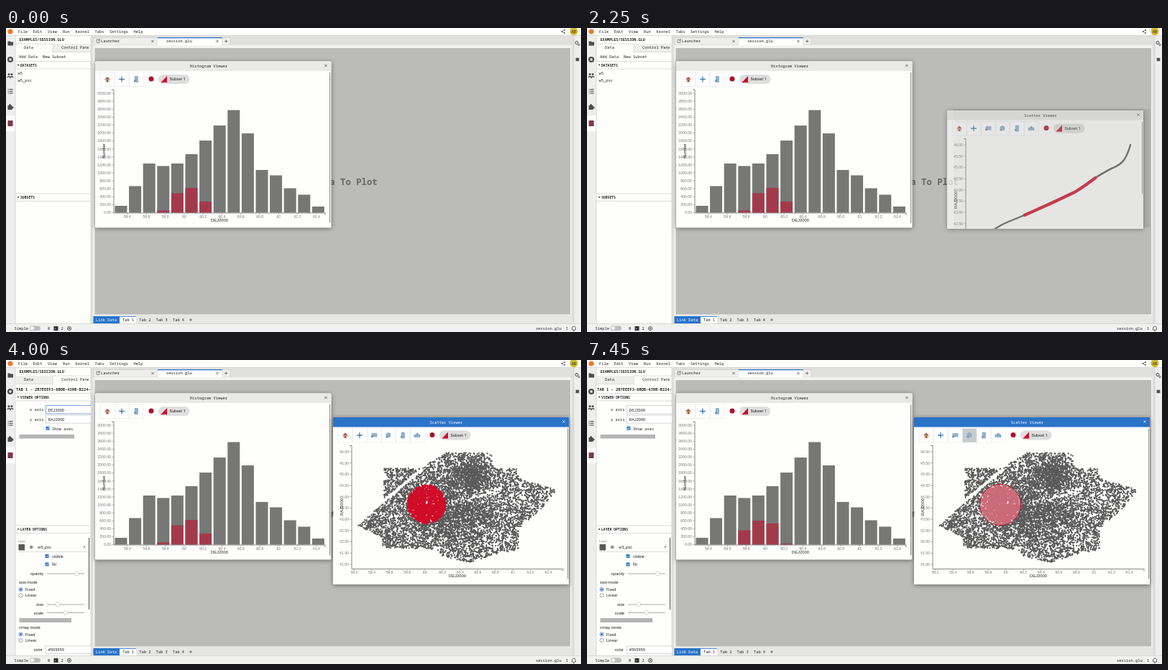
An HTML page that plays this animation: 800x424 px, repeating every 7700 ms.

```html
<!DOCTYPE html>
<html lang="en">
<head>
<meta charset="utf-8">
<title>Viewer session</title>
<style>
  html, body { margin: 0; width: 100%; height: 100%; overflow: hidden; background: #fefefd; }
  svg { display: block; width: 800px; height: 424px; }
  text { font: 5.42px "Noto Sans Mono", "DejaVu Sans Mono", monospace; fill: #222; white-space: pre; }
  .sans { font-family: Roboto, "Open Sans", sans-serif; }
  .plot { font-family: "Liberation Sans", Arial, sans-serif; }
  .bold { font-weight: 700; }
  .lift { filter: drop-shadow(0 1px 3px rgba(0, 0, 0, .45)); }
</style>
</head>
<body>
<svg id="stage" viewBox="0 0 800 424"></svg>
<script>
const LOOP = 7700, STEP = 50;
const BLUE = '#2a73c9', INK = '#4d4d4d', RED = '#d00c28', GREY = '#595959', LINE = '#c8c8c8';

// ---- drawing helpers ----
const rect = (x, y, w, h, fill, more = '') =>
  `<rect x="${x}" y="${y}" width="${w}" height="${h}" fill="${fill}" ${more}/>`;
const box = (x, y, w, h, fill, stroke, more = '') =>
  rect(x, y, w, h, fill, `stroke="${stroke}" stroke-width=".6" ${more}`);
const disc = (x, y, r, fill, more = '') => `<circle cx="${x}" cy="${y}" r="${r}" fill="${fill}" ${more}/>`;
const path = (d, stroke, width = 1, more = '') =>
  `<path d="${d}" fill="none" stroke="${stroke}" stroke-width="${width}" ${more}/>`;
const text = (x, y, s, { size = 5.42, cls = '', fill = '#222', at = 'start', more = '' } = {}) =>
  `<text x="${x}" y="${y}" class="${cls}" text-anchor="${at}" style="font-size:${size}px;fill:${fill}" ${more}>${s}</text>`;
const group = (id, body, more = '') => `<g id="${id}" ${more}>${body}</g>`;
const range = (n, f) => Array.from({ length: n }, (_, i) => f(i)).join('');
const cross = (x, y, color = '#444', r = 1.7) =>
  path(`M${x - r} ${y - r}l${2 * r} ${2 * r}M${x + r} ${y - r}l${-2 * r} ${2 * r}`, color, .7);
const sans = (x, y, s, size = 5.6) => text(x, y, s, { size, cls: 'sans' });
const header = (y, s) => path(`M13 ${y}H118M13 ${y + 10.5}H118`, LINE, .6) +
  `<path d="M15.5 ${y + 4.3}h3l-1.5 2z" fill="#333"/>` + text(20, y + 7.2, s, { size: 4.75, cls: 'bold' });

// ---- application shell ----
function shell() {
  const menu = [['File', 17], ['Edit', 37.5], ['View', 58], ['Run', 79], ['Kernel', 96.5], ['Tabs', 123.5], ['Settings', 144], ['Help', 177.5]];
  const sideIcons =
    `<path d="M2.5 18.5h3l1 1h3.5v5h-7.500z" fill="${INK}"/>` +
    disc(6, 44, 4, INK) + rect(4.5, 42.500, 3, 3, '#eee') +
    disc(4, 64.500, 1.5, INK) + disc(8, 64.500, 1.5, INK) + path('M2 69q2-3 4 0q2-3 4 0', INK, 1.6) +
    range(3, i => rect(2.5, 85 + i * 2.7, 1.2, 1.1, INK) + rect(4.5, 85 + i * 2.7, 5, 1.1, INK)) +
    rect(2.5, 108, 6, 6, INK) + disc(5.5, 107.5, 1.5, INK) + disc(9, 111, 1.5, INK);
  return rect(0, 0, 800, 424, '#fefefd') +
    disc(6, 5, 3.5, '#f37726') + menu.map(([s, x]) => text(x, 7, s)).join('') +
    disc(773.5, 5, .9, INK) + disc(777, 3, .9, INK) + disc(777, 7, .9, INK) + path('M777 3l-3.500 2l3.500 2', INK, .6) +
    disc(790, 4.5, 5.5, '#cdb92c') + text(790, 6.500, 'AB', { at: 'middle', size: 5, cls: 'sans' }) +
    rect(0, 10.5, 13, 402, '#eeeeed') + rect(0, 122, 13, 22, '#fefefd') + sideIcons + rect(2.5, 129, 7, 8, '#7a3a4a') +
    rect(790, 10.5, 10, 402, '#eeeeed') + disc(794, 20.5, 2, 'none', `stroke="${INK}"`) + disc(797, 23.500, 1.2, 'none', `stroke="${INK}" stroke-width=".8"`) +
    disc(795, 44, 2.4, INK) + path('M792 42l6 4M798 42l-6 4', INK, .6) +
    rect(118, 10.5, 672, 402, '#e0e0df') + path('M0 10.500H800M13 10.500V412M118 10.500V412M790 10.500V412', LINE, .6) +
    box(122, 13.5, 89, 10.500, '#eeeeed', LINE) + box(126, 16, 4, 4.500, 'none', INK) + path('M128 18.500l2.500-3', INK, .7) +
    text(132, 20.3, 'Launcher') + cross(204, 18.5) +
    rect(211, 13, 90, 12, '#fefefd') + rect(211, 13, 90, 1.300, BLUE) + text(223, 20.3, 'session.glu') + cross(294, 18.5) +
    box(301, 13.5, 11, 10.500, '#eeeeed', LINE) + path('M304 18.500h4.500M306.250 16.250v4.500', INK, .7) +
    rect(121.5, 24, 665, 388, '#f3f3f2') + rect(123.5, 28, 661.5, 371.5, '#bbbbba') +
    text(454, 218.5, 'Drag Data To Plot', { size: 12.3, cls: 'bold', at: 'middle', fill: '#666' }) +
    rect(121.5, 400.5, 665, 12, '#e6e6e5') + rect(121.5, 402, 36.5, 10, BLUE) + text(125, 408.8, 'Link Data', { fill: '#fff' }) +
    rect(158, 402, 23, 10, '#fefefd') + rect(158, 402, 23, .8, BLUE) + range(4, i => text(162 + i * 23.3, 408.8, `Tab ${i + 1}`)) +
    path('M255 407h4M257 405v4', INK, .7) +
    rect(0, 412.5, 800, 11.5, '#f1f1f0') + path('M0 412.500H800', LINE, .6) +
    text(11.5, 420.8, 'Simple') + rect(33, 415.5, 15, 6.5, '#bdbdbd', 'rx="3.2"') + disc(36.5, 418.700, 2.9, '#fff', 'stroke="#999" stroke-width=".5"') +
    text(58, 420.8, '0') + rect(66.500, 416, 6, 6, '#333') + text(67, 420.800, '›', { fill: '#fff' }) + text(76.5, 420.8, '2') +
    disc(88, 419, 2.500, 'none', `stroke="${INK}" stroke-width="1"`) + disc(88, 419, 1, INK) +
    text(737, 420.8, 'session.glu') + text(779, 420.8, '1') + path('M787.500 421v-2q0-3 2.500-3t2.500 3v2zM789 422.500h2', INK, .8);
}

const sideTabs = active => rect(active ? 13.3 : 65, 22, active ? 52 : 53, 11.5, '#eeeeed') +
  path(active ? 'M13 33.500H65V22H118' : 'M118 33.500H65V22H13', LINE, .6) + text(25, 29.3, 'Data') +
  text(77, 29.3, 'Control Panel', { more: 'clip-path="url(#tabClip)"' });

const dataPanel = () => sideTabs(0) + text(18, 42, 'Add Data') + text(51, 42, 'New Subset') +
  header(46.5, 'DATASETS') + group('hover', rect(13.5, 69, 104, 9, '#e6e6e6')) +
  text(16.5, 65, 'w5') + text(16.5, 75, 'w5_psc') + header(231, 'SUBSETS');

function controlPanel() {
  const field = (y, h, s, id = '') => box(55.3, y, 70, h, '#fff', '#bbb', id) + sans(58.5, y + h * .7, s);
  const check = (x, y) => rect(x, y, 5, 5, BLUE, 'rx=".6"') + path(`M${x + 1} ${y + 2.5}l1.200 1.300l2-2.600`, '#fff', .8);
  const radio = (y, on, s) => disc(20.5, y, 2.6, '#fff', `stroke="${on ? BLUE : '#777'}" stroke-width=".7"`) +
    (on ? disc(20.5, y, 1.500, BLUE) : '') + sans(27, y + 2, s);
  const slider = (y, x, s) => text(52, y + 2.2, s, { size: 5.6, cls: 'sans', at: 'end' }) +
    path(`M57 ${y}H109`, '#aaa', 1.2) + disc(x, y, 2.8, '#fff', 'stroke="#aaa" stroke-width=".5"');
  return sideTabs(1) + text(14, 42.8, 'TAB 1 - 2B7EEEF3-6BDB-439B-B224-', { cls: 'bold' }) + header(46.5, 'VIEWER OPTIONS') +
    text(33, 71.3, 'x axis') + field(63.5, 11.5, '<tspan id="xField">DEJ2000</tspan>', 'id="xBox"') +
    text(33, 84.500, 'y axis') + field(77, 11, 'RAJ2000') +
    check(55.500, 92.800) + text(64, 97.5, 'Show axes') + rect(18.5, 104, 76.5, 5.5, '#b4b4b4') +
    header(231, 'LAYER OPTIONS') + text(17, 253.5, 'Layer', { size: 4.2, cls: 'sans', fill: '#777' }) +
    rect(17.5, 257, 8.500, 8.500, GREY) + path('M32.500 261q2.700-3.500 5.400 0q-2.700 3.500-5.400 0z', INK, .8) + disc(35.2, 261, .9, INK) +
    sans(44, 262.800, 'w5_psc') + `<path d="M107.500 260h3l-1.500 1.800z" fill="#555"/>` + path('M17 267.500H113', '#bbb', .5) +
    rect(114.8, 248, 1.5, 100, '#777') +
    check(54.5, 271) + sans(64, 276, 'visible') + check(54.5, 282.500) + sans(64, 287.3, 'fill') +
    slider(298, 98.5, 'opacity') + sans(18, 311.800, 'size mode') + radio(320, 1, 'Fixed') + radio(328.3, 0, 'Linear') +
    slider(341, 72, 'size') + slider(352.5, 83, 'scale') + rect(18.5, 360, 72.5, 6, '#b4b4b4') +
    sans(18, 374.800, 'cmap mode') + radio(382.5, 1, 'Fixed') + radio(391, 0, 'Linear') +
    text(51, 405.8, 'color', { size: 5.6, cls: 'sans', at: 'end' }) + field(399, 10.5, '#595959');
}

// ---- viewers: both share the same local layout ----
const icons = {
  home: x => `<path d="M${x - 4} 25.500l4-4l4 4z" fill="#a8543c"/>` + rect(x - 2.8, 25, 5.6, 3.8, '#d9b79a') + rect(x - .8, 26, 1.800, 2.8, '#7a4a35'),
  move: x => path(`M${x - 4} 25h8M${x} 21v8`, '#4a84b8', 1.3) + disc(x, 25, 1.3, '#4a84b8'),
  area: x => box(x - 3, 22.5, 7, 4.500, '#8bb3d8', '#7a9cbc') + rect(x - 4, 25.5, 3, 2.500, '#7f8fa0'),
  round: x => disc(x, 24.8, 3.2, '#8bb3d8', 'stroke="#7a9cbc" stroke-width=".6"') + rect(x - 3.500, 26.5, 2.5, 2, '#7f8fa0'),
  column: x => box(x - 1.800, 21, 4.2, 8, '#8bb3d8', '#7a9cbc') + rect(x - 3, 26, 2.5, 2.5, '#7f8fa0'),
  row: x => box(x - 4, 24, 8, 3.6, '#8bb3d8', '#7a9cbc') + rect(x - 1, 22, 2.5, 2.500, '#7f8fa0')
};

function toolbar(names) {
  const end = 17 + names.length * 20;
  return names.map((name, i) => {
    const x = 17 + i * 20;
    return box(x - 9.5, 15.5, 19.5, 19.5, '#fff', '#e6e6e6', `class="tool-${name}"`) + icons[name](x);
  }).join('') + disc(end + 1, 24.6, 3.5, '#a81428') + rect(end + 11, 18.5, 43.5, 13, '#dedede', 'rx="6.5"') +
    `<path d="M${end + 14.5} 29.500l8.500-9v9z" fill="${RED}"/>` + sans(end + 26.500, 26.6, 'Subset 1', 5.7);
}

const yAxis = (n, first, gap, label, title) => path('M23 39.500h3V211.500', '#555', .7) +
  range(n, i => path(`M23 ${first - i * gap}h3`, '#777', .5) +
    text(22, first - i * gap + 1.8, label(i), { size: 5.2, cls: 'plot', fill: '#777', at: 'end' })) +
  text(0, 0, title, { size: 5.8, cls: 'plot', at: 'middle', more: 'transform="translate(14 125)rotate(-90)"' });
const xAxis = (n, first, gap, label, title) => path('M26 211.500H320v3', '#555', .7) +
  range(n, i => path(`M${first + i * gap} 211.500v2.500`, '#777', .5) +
    text(first + i * gap, 218.4, label(i), { size: 5.1, cls: 'plot', fill: '#777', at: 'middle' })) +
  text(173, 223.4, title, { size: 5.8, cls: 'plot', at: 'middle' });
const degrees = first => i => String(+(first + i * .2).toFixed(1));

const bars = (tops, from, fill) => tops.map((top, i) =>
  rect((27.5 + (from + i) * 19.6).toFixed(1), top - 46.5, 17, 257.5 - top, fill)).join('');

const histogram = () => rect(0, 0, 328.5, 232, '#fefefd', 'rx="1.5" class="lift"') + rect(0, 0, 328.5, 13.5, '#e9e9e8', 'rx="1.5"') +
  text(158, 8.7, 'Histogram Viewer', { at: 'middle' }) + cross(321, 6) + toolbar(['home', 'move', 'column']) +
  rect(326, 15.5, 1.2, 210, '#999') +
  bars([248, 220.5, 189, 192.5, 189, 176, 157, 136, 114.5, 147, 198, 205.5, 223.5, 232.5, 249], 0, '#777776') +
  group('bars0', bars([254.5, 230.5, 223, 242], 3, '#a33a4b')) +
  group('bars1', bars([249, 228, 231, 252.5], 1, '#a33a4b')) +
  group('bars2', bars([237.5, 224, 228, 256], 3, '#a33a4b')) +
  yAxis(16, 211, 11.09, i => (i * 200).toFixed(2), 'Number') + xAxis(11, 45, 26.3, degrees(59.4), 'DEJ2000');

// ---- star field ----
const FIELD = [[490, 231], [526, 198], [526, 151], [580, 151], [593, 140], [614, 129], [676, 130], [679, 151], [712, 151], [713, 165],
  [766, 181], [745, 208], [713, 235], [713, 266], [690, 268], [668, 276], [642, 283], [606, 273], [600, 264], [523, 262], [523, 247]];
const CENTRES = [[585, 201], [540, 218], [575, 202]];

function inside(x, y) {
  let hit = false;
  FIELD.forEach(([ax, ay], i) => {
    const [bx, by] = FIELD[(i + 1) % FIELD.length];
    if (ay > y !== by > y && x < ax + (bx - ax) * (y - ay) / (by - ay)) hit = !hit;
  });
  return hit;
}

function makeStars() {
  let seed = 7;
  const random = () => (seed = (seed * 1664525 + 1013904223) % 4294967296) / 4294967296;
  const spread = () => random() + random() + random() - 1.5;
  const stars = [];
  while (stars.length < 8600) {
    const pick = random();
    let x, y;
    if (pick < .05) [x, y] = [646 + spread() * 26, 160 + spread() * 22];
    else if (pick < .13) [x, y] = [630 + spread() * 60, 215 + spread() * 36];
    else if (pick < .2) [x, y] = [582 + spread() * 60, 205 + spread() * 50];
    else [x, y] = [488 + random() * 280, 127 + random() * 158];
    const gap = Math.abs(y - 153 - (578 - x) * .83) < 3.2 && x > 512 && x < 580;
    const sparse = Math.abs(y - 193 + (x - 645) * .3) < 4 && x > 612 && x < 690 && random() < .6;
    if (!gap && !sparse && inside(x, y)) stars.push([x, y]);
  }
  return stars;
}
const dots = list => list.map(([x, y]) => `M${x.toFixed(1)} ${y.toFixed(1)}h0`).join('');

function scatter() {
  const stars = makeStars(), cap = 'stroke-linecap="round"';
  const near = ([cx, cy]) => stars.filter(([x, y]) => Math.hypot(x - cx, y - cy) < 26.5);
  const thin = 'vector-effect="non-scaling-stroke" stroke-linecap="round" stroke-linejoin="round"';
  const curve = path('M30 212Q45 177 67 165Q76 159 86 155L108 146Q145 130 178 114Q190 107 207 94Q216 88 231 80', GREY, 2.400, thin) +
    path('M207 94Q216 88 232 80Q243 75 247 69Q252 62 256 48', GREY, 2.4, thin) +
    path('M108 146Q145 130 178 114Q190 107 207 94', RED, 4.2, thin);
  const field = path(dots(stars), GREY, 2.3, cap) + CENTRES.map((c, i) => group('stars' + i, path(dots(near(c)), RED, 3.3, cap))).join('');
  return rect(0, 0, 328, 233, '#fefefd', 'id="frame" class="lift"') +
    group('inner', rect(0, 0, 328, 13.5, '#e9e9e8', 'id="bar"') + text(164, 8.7, 'Scatter Viewer', { at: 'middle', more: 'id="caption"' }) +
      group('close', cross(0, 6)) + toolbar(['home', 'move', 'area', 'round', 'column', 'row']) + rect(0, 15.5, 1.2, 101, '#999', 'id="scroll"') +
      yAxis(11, 205, 15.7, i => (41 + i / 2).toFixed(2), 'RAJ2000') +
      group('linePlot', group('curve', curve) + xAxis(9, 26, 33, i => String(i * 2000), 'Pixel Axis 0 [x]')) +
      group('fieldPlot', xAxis(12, 29.5, 24.55, degrees(59.2), 'DEJ2000') + group('field', field +
        disc(0, 0, 0, 'rgba(200,200,200,.5)', 'id="brush" stroke-width="1"'), 'transform="translate(-455 -80)"')), 'clip-path="url(#winClip)"') +
    group('grip', range(3, i => rect(-2, 131.500 + i * 2, .9, .9, '#333') + rect(-.4, 131.500 + i * 2, .9, .9, '#333'))) +
    group('handles', group('left', path('M2 -4l4-4M2 -6v2h2M4 -8h2v2', '#333', .8)) + group('right', path('M-6 -8l4 4M-6 -6v-2h2M-4 -4h2v-2', '#333', .8)));
}

const dialog = () => rect(0, 0, 800, 424, 'rgba(0,0,0,.25)') + rect(0, 423, 800, 1, '#111') +
  rect(338, 176.5, 125.5, 70, '#fefefd', 'style="filter:drop-shadow(0 2px 7px rgba(0,0,0,.5))"') +
  text(348.3, 194, 'Viewer Type', { size: 7.65 }) + rect(348.8, 202.3, 103.8, 10.6, '#fff', `stroke="${BLUE}" stroke-width=".9"`) +
  text(352, 209.6, '', { size: 6.35, cls: 'plot', more: 'id="choice"' }) + path('M444.500 206.500l2 2l2-2', '#333', .8) +
  rect(401.5, 223.5, 29, 13.5, '#757575') + text(416, 232.4, 'Cancel', { size: 6.1, cls: 'plot', at: 'middle', fill: '#fff' }) +
  rect(435.5, 223.5, 17.5, 13.5, BLUE) + text(444.3, 232.4, 'Ok', { size: 6.1, cls: 'plot', at: 'middle', fill: '#fff' }) +
  path('M459 245.500l3.500-3.500M461 245.500l1.500-1.500', '#444', .6);

const stage = document.getElementById('stage');
stage.innerHTML = `<defs><clipPath id="tabClip">${rect(65, 20, 50, 14, '#000')}</clipPath>` +
  `<clipPath id="sideClip">${rect(13, 11, 105, 401, '#000')}</clipPath><clipPath id="winClip">${rect(0, 0, 328, 233, '#000', 'id="winRect"')}</clipPath></defs>` +
  shell() + group('side', text(18.5, 17.6, 'EXAMPLES/SESSION.GLU', { size: 5.2, cls: 'bold' }) +
    group('data', dataPanel()) + group('control', controlPanel()), 'clip-path="url(#sideClip)"') +
  rect(510, 113, 273.5, 165.5, '#000', 'id="slot" opacity=".08"') +
  group('hist', histogram(), 'transform="translate(124 46.500)"') + group('win', scatter()) +
  group('ghost', box(0, 0, 40, 9, '#eee', '#ccc') + text(3, 6.3, 'w5_psc'), 'opacity=".8"') + group('dialog', dialog());

// ---- animation ----
const el = {};
stage.querySelectorAll('[id]').forEach(node => el[node.id] = node);
const tool = stage.querySelector('.tool-round');
const show = (id, on) => { el[id].style.display = on ? '' : 'none'; };
const set = (id, values) => { for (const k in values) el[id].setAttribute(k, values[k]); };
const move = (id, x, y) => set(id, { transform: `translate(${x} ${y})` });

function track(t, keys) {
  const i = keys.findIndex(key => key[0] > t);
  if (i < 1) return (i ? keys[keys.length - 1] : keys[0]).slice(1);
  const [a, b] = [keys[i - 1], keys[i]], p = (t - a[0]) / (b[0] - a[0]);
  return a.slice(1).map((v, k) => v + (b[k + 1] - v) * p);
}
const WINDOW = [[2100, 510, 113, 273, 165], [2250, 501, 115, 273, 165], [2850, 509, 81, 275, 168], [2950, 509, 81, 275, 168], [3400, 455, 80, 328, 233]];
const BRUSH = [[4700, 512, 190, 0], [5050, 540, 218, 29], [6550, 540, 218, 29], [6700, 575, 202, 28.5]];

function drawWindow(t) {
  const [x, y, w, h] = track(t, WINDOW), active = t >= 3500;
  move('win', x, y);
  set('win', { opacity: t >= 2100 && t < 2900 ? .7 : t >= 2900 && t < 3450 ? .47 : 1 });
  set('frame', { width: w, height: h });
  set('winRect', { width: w, height: h });
  set('bar', { width: w, fill: active ? BLUE : '#e9e9e8' });
  set('caption', { x: w / 2 - 6.5 });
  el.caption.style.fill = active ? '#fff' : '#222';
  move('close', w - 7, 0);
  el.close.firstChild.setAttribute('stroke', active ? '#fff' : '#444');
  set('scroll', { x: w - 2, height: Math.max(0, 101 + (h - 165) * 1.6) });
  set('curve', { transform: `translate(26 0)scale(${(w - 34) / 240} 1)translate(-26 0)` });
  move('left', 2, h - 1);
  move('right', w - 2, h - 1);
  show('handles', t >= 2900 && t < 3500 || t >= 4350 && t < 5600);
  show('grip', active);
  show('linePlot', t < 3950);
  show('fieldPlot', t >= 3950);
  tool.setAttribute('fill', t >= 4450 ? '#c9cccf' : '#fff');
}

function render(t) {
  show('hover', t >= 300 && t < 1050);
  show('ghost', t >= 450 && t < 1050);
  move('ghost', ...track(t, [[450, 16, 70], [1000, 520, 150]]));
  show('dialog', t >= 1050 && t < 1800);
  el.choice.textContent = t < 1350 ? '1D Histogram' : '2D Scatter';
  show('data', t < 3550);
  show('control', t >= 3550);
  set('xBox', { stroke: t >= 3800 && t < 4400 ? BLUE : '#bbb' });
  el.xField.textContent = t < 3950 ? 'Pixel Axis 0 [x]' : 'DEJ2000';

  show('slot', t >= 2100 && t < 3450);
  set('slot', { y: t < 2600 ? 113 : 81 });
  show('win', t >= 1850);
  drawWindow(t);

  const subset = t < 5600 ? 0 : t < 6700 ? 1 : 2;
  CENTRES.forEach((_, i) => {
    show('stars' + i, i === subset);
    show('bars' + i, i === subset);
  });
  const [cx, cy, r] = track(t, BRUSH);
  set('brush', { cx, cy, r, stroke: t < 5600 ? '#b5b5b5' : RED });
}

const start = performance.now();
let shown = -1;
function tick() {
  const t = Math.floor((performance.now() - start) % LOOP / STEP) * STEP;
  if (t !== shown) render(shown = t);
  requestAnimationFrame(tick);
}
tick();
</script>
</body>
</html>
```
